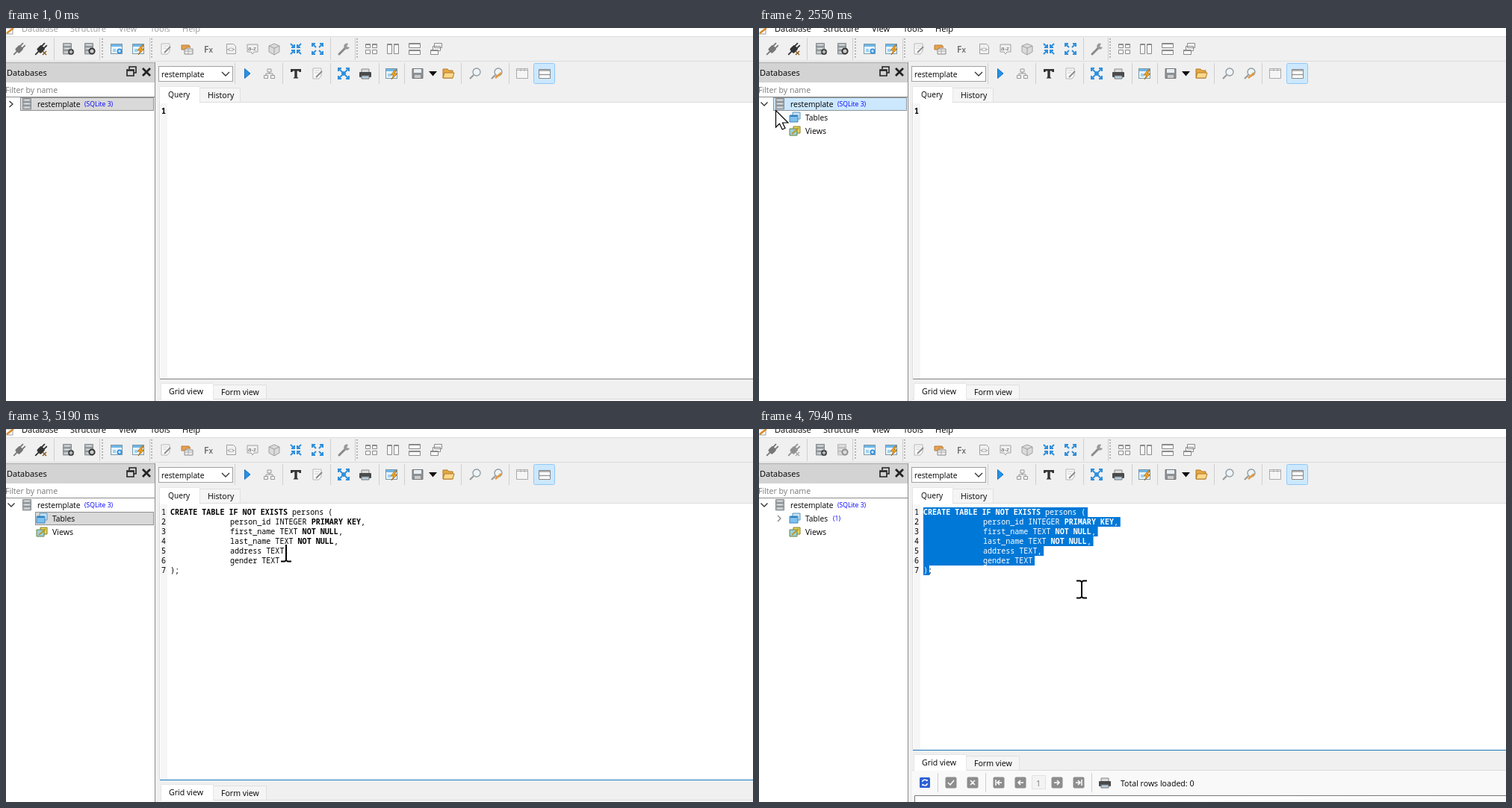
Animation of 1000 by 500 pixels, one loop 8000 ms. Source, as an HTML page:

```html
<!DOCTYPE html>
<html lang="en">
<head>
<meta charset="utf-8">
<title>Creating a table</title>
<style>
html, body { margin: 0; width: 100%; height: 100%; overflow: hidden; background: #f0f0f0; }
svg { display: block; width: 1000px; height: 500px; }
text { font: 10.6px "Open Sans", "Noto Sans", sans-serif; white-space: pre; }
.menu text { font-size: 11.1px; }
.name { font-size: 10.25px; }
.note { font-size: 8.6px; fill: #00f; }
.code text { font: 10.07px "Noto Sans Mono", monospace; }
.code .key { font-weight: 700; }
.blue { fill: none; stroke: #2f8fdd; stroke-width: 2; }
.sep { stroke: #cfcfcf; fill: none; }
.grip { stroke: #a5a5a5; stroke-width: 2; stroke-dasharray: 1.5 2.5; fill: none; }
.chevron { fill: none; stroke: #333; stroke-width: 1.3; }
</style>
</head>
<body>
<svg viewBox="0 0 1000 500">
<defs>
  <g id="plug" transform="rotate(-45)">
    <path d="M-11 0H-4M3-2H9M3 2H9" stroke="currentColor" stroke-width="1.8"/>
    <rect x="-5" y="-4" width="9" height="8" rx="2" fill="currentColor"/>
  </g>
  <g id="db" fill="#b4babd" stroke="#84898c">
    <path d="M-6.5-7.5h11v4.6h-11zM-6.5-2.9h11v4.8h-11zM-6.5 1.9h11v5h-11z"/>
    <path d="M-4-5.2h6M-4-.5h6M-4 4.4h6" stroke="#e4e8ea"/>
  </g>
  <g id="badge"><circle cx="4" cy="4" r="4" fill="#444"/><path d="M1.5 4h5M4 1.5v5" stroke="#fff"/></g>
  <g id="win">
    <rect x="-7.5" y="-6.5" width="15" height="13" fill="#e9f5fb" stroke="#7c98a8"/>
    <path d="M-7-4.5H7" stroke="#6fb6e6" stroke-width="3"/>
    <path d="M-5 0h4v4h-4z" fill="#9bd2f2"/>
  </g>
  <path id="bolt" d="M5-5L-1 2H3L0 8 8 0H4L7-5Z" fill="#f6a623" stroke="#9c6412" stroke-width=".8"/>
  <g id="winbolt"><use href="#win"/><use href="#bolt"/></g>
  <g id="note">
    <path d="M-6-7H5V3L2 7H-6Z" fill="#fafafa" stroke="#b5b5b5"/>
    <path d="M-4-4H3M-4-1H1" stroke="#ccc"/>
    <path d="M-2 5L6-3" stroke="#8b8b8b" stroke-width="2"/>
  </g>
  <g id="arrows" class="blue">
    <path d="M-7-7L-2-2M7-7L2-2M-7 7L-2 2M7 7L2 2"/>
  </g>
  <g id="inward"><use href="#arrows"/><path class="blue" d="M-6-2H-2V-6M6-2H2V-6M-6 2H-2V6M6 2H2V6"/></g>
  <g id="outward"><use href="#arrows"/><path class="blue" d="M-7-3V-7H-3M7-3V-7H3M-7 3V7H-3M7 3V7H3"/></g>
  <g id="printer">
    <path d="M-5-6H5V-1H-5Z" fill="#ddd" stroke="#888"/>
    <rect x="-8" y="-2" width="16" height="7" rx="1" fill="#4a4a4a"/>
    <path d="M-5 3H5V7H-5Z" fill="#b7d0e0" stroke="#777"/>
  </g>
  <g id="lens">
    <circle cx="2" cy="-2" r="5" fill="#eef4f7" stroke="#8d9aa2" stroke-width="1.3"/>
    <path d="M-2 2L-7 7" stroke="#999" stroke-width="2.2"/>
  </g>
  <g id="hand">
    <path d="M-8-5H2L4-2H-2V1H-8Z" fill="#e9a04b" stroke="#b67d3a"/>
    <path d="M-4 0H7V7H-4Z" fill="#eee" stroke="#888"/><path d="M-4 3H7M1 0V7" stroke="#aaa"/>
  </g>
  <g id="tables">
    <path d="M-3-7H7V2H-3Z" fill="#c7e3f5" stroke="#5a95bd"/>
    <path d="M-7-3H4V6H-7Z" fill="#7fc0ee" stroke="#4088bb"/><path d="M-6-2H3" stroke="#2f7fc0" stroke-width="2"/>
  </g>
  <g id="views">
    <path d="M-2-6H7V3H-2Z" fill="#e8d75a" stroke="#8a7f28"/>
    <path d="M-7-3H3V6H-7Z" fill="#9ed0de" stroke="#66823d"/><path d="M-4 4L5-4" stroke="#bd9b20" stroke-width="2"/>
  </g>
  <g id="tile"><rect x="-7.5" y="-7.5" width="15" height="15" rx="2" fill="#8d8d8d"/></g>
</defs>

<rect width="1000" height="500" fill="#f0f0f0"/>
<rect width="1000" height="11" fill="#fff"/>
<path d="M0 11.5H1000M0 44.5H1000" class="sep" opacity=".6"/>
<path d="M0 0H9V8H0" fill="#fff" stroke="#999"/><path d="M1 7L10 0" stroke="#d58a2c" stroke-width="2.5"/>
<g id="menu" class="menu">
  <text x="21" y="5">Database</text><text x="86" y="5">Structure</text><text x="151" y="5">View</text>
  <text x="193" y="5">Tools</text><text x="236" y="5">Help</text>
</g>

<!-- main toolbar -->
<path class="sep" d="M64.5 13V43M125.5 13V43M192.5 13V43M434.5 13V43M467.5 13V43"/>
<path class="grip" d="M129 14V42M195 14V42M470 14V42"/>
<g transform="translate(0 28)">
  <g transform="translate(18)" color="#777"><use href="#plug"/></g>
  <g class="fades" transform="translate(47)" color="#333"><use href="#plug"/><path d="M2 3l5 5M7 3l-5 5" stroke="#8a5a20" stroke-width="1.5"/></g>
  <g transform="translate(83)"><use href="#db"/><use href="#badge"/></g>
  <g class="fades" transform="translate(112)"><use href="#db"/><circle cx="3" cy="3" r="3.6" fill="#ccc" stroke="#333" stroke-width="2"/></g>
  <g transform="translate(148)"><use href="#win"/><circle cx="4" cy="3" r="3.5" fill="#2f8fdd"/><path d="M2 3h4M4 1v4" stroke="#fff"/></g>
  <use href="#winbolt" x="177"/><use href="#note" x="214"/><use href="#hand" x="243"/>
  <text x="265" y="5" style="font-size:12px;font-weight:600" fill="#666">F<tspan font-size="10">x</tspan></text>
  <g fill="none" stroke="#a0a0a0">
    <path d="M295.500-6.500H304.500L307.500-3.500V6.500H295.500Z"/>
    <path d="M323-6H337V4H332L330 7 328 4H323Z"/>
    <path d="M352-4L359-7 366-4V4L359 8 352 4Z" fill="#dadada"/><path d="M352-4L359-1 366-4M359-1V8"/>
  </g>
  <text x="296" y="4" style="font-size:9px" fill="#777">&lt;&gt;</text><text x="324" y="2" style="font-size:8px" fill="#555">a-z</text>
  <use href="#inward" x="388"/><use href="#outward" x="417"/>
  <path d="M446 7L454-1" stroke="#8a8a8a" stroke-width="3" stroke-linecap="round"/><path d="M458-7A4 4 0 1 0 460-2L456-3Z" fill="#999"/>
  <g fill="#f8f8f8" stroke="#8a8a8a">
    <path d="M481.5-6.5h6v5h-6zM490.5-6.5h6v5h-6zM481.5 1.5h6v5h-6zM490.5 1.5h6v5h-6z"/>
    <path d="M510.5-6.5h6v13h-6zM519.5-6.5h6v13h-6z"/>
    <path d="M539.5-7.5h15v6h-15zM539.5 1.5h15v6h-15z"/>
    <path d="M573.5-7.5h10v6h-10zM571.5-3.5h10v6h-10zM568.5 1.5h10v6h-10z"/>
  </g>
  <path d="M482-5.5h5M491-5.5h5M511-5.5h5M520-5.5h5M540-6.5h14M540 2.5h14M569 2.5h9" stroke="#8a8a8a"/>
</g>

<!-- database tree -->
<rect y="46" width="199" height="27" fill="#d3d3d3"/><path d="M0 46.5H199" stroke="#a8a8a8"/>
<text x="1" y="64" style="font-size:11px">Databases</text>
<path fill="none" stroke="#222" stroke-width="1.6" d="M165 55V52H174V60H171M162 56H171V64H162ZM162 57H171"/>
<path d="M183 54L193 64M193 54L183 64" stroke="#222" stroke-width="2.8"/>
<rect y="73" width="199" height="427" fill="#fff"/>
<text x="-1" y="87" fill="#7a7a7a">Filter by name</text>
<path d="M0 92.5H199M199.5 46V500" stroke="#8c8c8c"/>
<g stroke="#333" stroke-dasharray="1 1">
  <rect data-on="0-2150" x="19.5" y="93.5" width="178" height="17" fill="#d9d9d9"/>
  <rect data-on="2150-2935" x="19.5" y="93.5" width="178" height="17" fill="#cce8ff"/>
  <rect data-on="2935-3600" x="39.5" y="111.5" width="158" height="17" fill="#cce8ff"/>
  <rect data-on="3600-7610" x="39.5" y="111.5" width="158" height="17" fill="#d9d9d9"/>
</g>
<path class="chevron" data-on="0-2250" d="M4.500 98l4.500 4-4.500 4"/>
<use href="#db" x="29" y="102"/>
<text class="name" x="42" y="106">restemplate</text><text class="note" x="105" y="105">(SQLite 3)</text>
<g data-on="2250-8000">
  <path class="chevron" d="M2.500 99.500l4.500 4.500 4.500-4.500"/>
  <use href="#tables" x="48" y="120"/><text class="name" x="62" y="124">Tables</text>
  <use href="#views" x="48" y="138"/><text x="62" y="142">Views</text>
</g>
<g data-on="7610-8000"><path class="chevron" d="M25 116l4 4-4 4" opacity=".6"/><text class="note" x="99" y="123">(1)</text></g>

<!-- query toolbar -->
<rect x="204.500" y="51.500" width="99" height="20" fill="#fff" stroke="#a0a0a0"/>
<text class="name" x="208" y="66">restemplate</text><path class="chevron" d="M289 59l5 5 5-5"/>
<path class="sep" d="M306.500 47V75M370.500 47V75M434.500 47V75M499.500 47V75M533.500 47V75M609.500 47V75M673.500 47V75"/>
<rect data-on="6690-7860" x="309.500" y="47.500" width="28" height="27" rx="2" fill="#e1f0fb" stroke="#b5d9f3"/>
<rect x="706.500" y="47.500" width="28" height="27" rx="2" fill="#cce8ff" stroke="#90c8f6"/>
<g transform="translate(0 61)">
  <path d="M319.500-6.500L327 0 319.500 6.500Z" fill="#2492e8" stroke="#1671bd"/>
  <path fill="none" stroke="#999" d="M350-6h5v4h-5zM345.500 2.500h5v4h-5zM354.500 2.500h5v4h-5zM352.500-2V0M348 2V0H357V2"/>
  <path d="M381-6H395V-2H393L391.500-3.500H389.700V4.500L391.500 6.500H384.500L386.300 4.500V-3.500H384.500L383-2H381Z" fill="#333"/>
  <use href="#note" x="417"/><use href="#outward" x="452"/><circle cx="452" r="3" fill="#2f8fdd"/>
  <use href="#printer" x="481"/><use href="#winbolt" x="516"/>
  <path d="M544-6.500H558V6.500H544Z" fill="#8c9196" stroke="#777"/><path d="M546-6H556V-1H546Z" fill="#e8eef2"/><path d="M547 2H555V6H547Z" fill="#ccc"/>
  <path d="M566-3H577L571.500 3.500Z" fill="#111"/>
  <path d="M585-6H591L593-4H598V6H585Z" fill="#e5a844" stroke="#b27a25"/><path d="M585 6L587-1H600L598 6Z" fill="#fcd88b" stroke="#b27a25"/>
  <use href="#lens" x="628"/><use href="#lens" x="657"/><path d="M655 6L663-1" stroke="#e59a3c" stroke-width="2.600"/>
  <path d="M683.500-6.500H698.500V6.500H683.500Z" fill="#f5f5f5" stroke="#aaa"/><path d="M684-4.500H698M689-7V-3M694-7V-3" stroke="#aaa"/>
  <path d="M713.500-5.500H728.500V6.500H713.500Z" fill="#fff" stroke="#888"/><path d="M714-4H728M714 1.500H728" stroke="#999" stroke-width="1.500"/>
</g>

<!-- editor -->
<path d="M259.500 99V80.500H313.500V99" fill="#f5f5f5" stroke="#e0e0e0"/>
<path d="M205.500 100V78.500H259.500V100" fill="#fff" stroke="#e6e6e6"/>
<text x="217" y="93" style="font-size:10.200px">Query</text><text x="270" y="94">History</text>
<rect x="206" y="100" width="794" height="370" fill="#fff"/><path class="sep" d="M259 99.500H1000M205.500 99V470" opacity=".6"/>
<rect x="207" y="101" width="9" height="369" fill="#f6f6f6"/>
<g id="code" class="code"><text class="key" data-on="0-4830" x="208" y="115">1</text></g>
<rect id="caret" y="105" width="1" height="13"/>

<!-- result pane -->
<g id="results">
  <rect x="205" y="470" width="795" height="80" fill="#f0f0f0"/>
  <path id="edge" d="M206 470.500H1000" stroke="#828282"/>
  <rect x="205" y="497" width="795" height="60" fill="#f9f9f9"/>
  <path class="sep" d="M205 497.500H1000" opacity=".7"/>
  <path d="M277.500 497V478.500H348.500V497" fill="#f5f5f5" stroke="#e0e0e0"/>
  <path d="M207.500 498V476.500H277.500V498" fill="#fff" stroke="#e6e6e6"/>
  <text x="218" y="491">Grid view</text><text x="288" y="492">Form view</text>
  <g transform="translate(0 514)">
    <rect x="215" y="-7" width="14" height="14" rx="1.500" fill="#2d62d3"/>
    <path d="M218.500-1A3.500 3.500 0 0 1 225-2V-4M225.500 1A3.500 3.500 0 0 1 219 2V4" fill="none" stroke="#fff" stroke-width="1.500"/>
    <use href="#tile" x="257"/><use href="#tile" x="286"/><use href="#tile" x="321"/><use href="#tile" x="350"/><use href="#tile" x="399"/><use href="#tile" x="428"/>
    <path d="M253 0l3 3 5-6M283-3l6 6M289-3l-6 6M317-4V4M325 0H319M322-3l-3 3 3 3M354 0H347M350-3l-3 3 3 3M395 0H402M399-3l3 3-3 3M424 0H430M427-3l3 3-3 3M432-4V4" fill="none" stroke="#fff" stroke-width="1.500"/>
    <rect x="365.500" y="-9.500" width="18" height="18" fill="#f3f3f3" stroke="#e2e2e2"/><text x="371" y="5" fill="#777">1</text>
    <path class="sep" d="M239.500-13V13M303.500-13V13M445.500-13V13"/>
    <use href="#printer" x="463"/><text x="484" y="5">Total rows loaded: 0</text>
  </g>
  <path d="M208.500 545V531.500H1000" fill="#fff" stroke="#777"/>
</g>

<circle id="halo" r="17" fill="#f2e936" opacity=".75"/>
<g id="pointer">
  <path id="arrow" d="M.5.5V23L5.500 18.300 9.200 26 13 24.300 9.500 17H17Z" fill="#fff" stroke="#000" stroke-width="1.200"/>
  <g id="beam" fill="none" stroke="#000" stroke-width="2">
    <path id="serif" d="M-7-11.500H-2L0-10 2-11.500H7"/><path d="M0-11V11M-7 11.500H-2L0 10 2 11.500H7"/>
  </g>
</g>
</svg>
<script>
const $ = id => document.getElementById(id);
const PERIOD = 8000, ADVANCE = 6.04;
const PASTE = 4830, SELECT = 7690, FOCUS = 3600, RESULT = 7610;

const query = [
  '*CREATE TABLE IF NOT EXISTS* persons (',
  'person_id INTEGER *PRIMARY KEY*,',
  'first_name TEXT *NOT NULL*,',
  'last_name TEXT *NOT NULL*,',
  'address TEXT,',
  'gender TEXT',
  ');'
];

// Stars mark keywords; the inner lines start at a tab stop.
function codeLayer(selected) {
  return query.map((line, i) => {
    const last = i === query.length - 1;
    const x = i && !last ? 300 : 220, y = 115 + 13 * i;
    const length = line.replace(/\*/g, '').length;
    const end = last ? 228 : x + length * ADVANCE + 2.6;
    const spans = line.split('*').map((part, k) => `<tspan${k % 2 ? ' class="key"' : ''}>${part}</tspan>`).join('');
    const body = selected && last ? ')<tspan fill="#000">;</tspan>' : spans;
    const bar = selected ? `<rect x="220" y="${y - 10}" width="${end - 220}" height="13" fill="#0078d7"/>` : '';
    const number = `<text x="208" y="${y}">${i + 1}</text>`;
    return `${bar}${number}<text x="${x}" y="${y}" fill="${selected ? '#fff' : '#000'}">${body}</text>`;
  }).join('');
}
$('code').innerHTML += `<g data-on="${PASTE}-${SELECT}">${codeLayer(false)}</g><g data-on="${SELECT}-${PERIOD}">${codeLayer(true)}</g>`;

// Pointer moves: start, end, number of steps, target x, target y
const moves = [
  [70, 210, 3, 683, 283], [990, 1770, 11, 34, 102], [1870, 2020, 3, 6, 107],
  [2410, 2785, 6, 69, 119], [3410, 3490, 2, 379, 178], [4110, 4200, 2, 375, 166],
  [5590, 5740, 3, 332, 191], [5910, 6540, 9, 314, 84], [6615, 6690, 2, 321, 64],
  [6760, 6840, 2, 324, 61], [7860, 7940, 2, 432, 215]
];
const within = (t, ...spans) => spans.some(([from, to]) => t >= from && t < to);
const show = (el, on) => { el.style.display = on ? '' : 'none'; };
const timed = [...document.querySelectorAll('[data-on]')].map(el => [el, el.dataset.on.split('-').map(Number)]);

function pointerAt(t) {
  let x = 933, y = 512;
  for (const [start, end, steps, tx, ty] of moves) {
    if (t < start) break;
    const step = Math.min(steps, 1 + Math.floor((t - start) / (end - start) * (steps - 1) + 0.02));
    let p = step / steps;
    if (steps > 5) p = p * p * (3 - 2 * p);
    x += (tx - x) * p;
    y += (ty - y) * p;
  }
  return [x, y];
}

function draw(t) {
  timed.forEach(([el, span]) => show(el, within(t, span)));
  $('menu').setAttribute('fill', t < 2150 ? '#999' : '#000');
  $('edge').setAttribute('stroke', t < FOCUS ? '#828282' : '#1979bd');
  $('results').setAttribute('transform', `translate(0 ${t < RESULT ? 0 : -40})`);
  document.querySelectorAll('.fades').forEach(el => {
    el.style.opacity = t < RESULT ? 1 : 0.5;
    el.style.filter = t < RESULT ? '' : 'grayscale(1)';
  });

  show($('caret'), within(t, [FOCUS, 4200], [4660, 5190], [5590, 6250], [6780, 7320]));
  $('caret').setAttribute('transform', t < PASTE ? 'translate(220 0)' : 'translate(232 78)');

  const [x, y] = pointerAt(t);
  const place = `translate(${Math.round(x)} ${Math.round(y)})`;
  const inEditor = x > 206 && y > 100 && y < 470;
  $('pointer').setAttribute('transform', place);
  $('halo').setAttribute('transform', place);
  show($('pointer'), t >= 70 && !within(t, [3240, 3410]));
  show($('halo'), within(t, [2150, 2410], [2935, 3080], [3560, 3710], [7530, SELECT]));
  show($('arrow'), !inEditor);
  show($('beam'), inEditor);
  show($('serif'), !within(t, [PASTE, 5590]));
}

const origin = performance.now();
function frame() {
  draw((performance.now() - origin) % PERIOD);
  requestAnimationFrame(frame);
}
frame();
</script>
</body>
</html>
```
